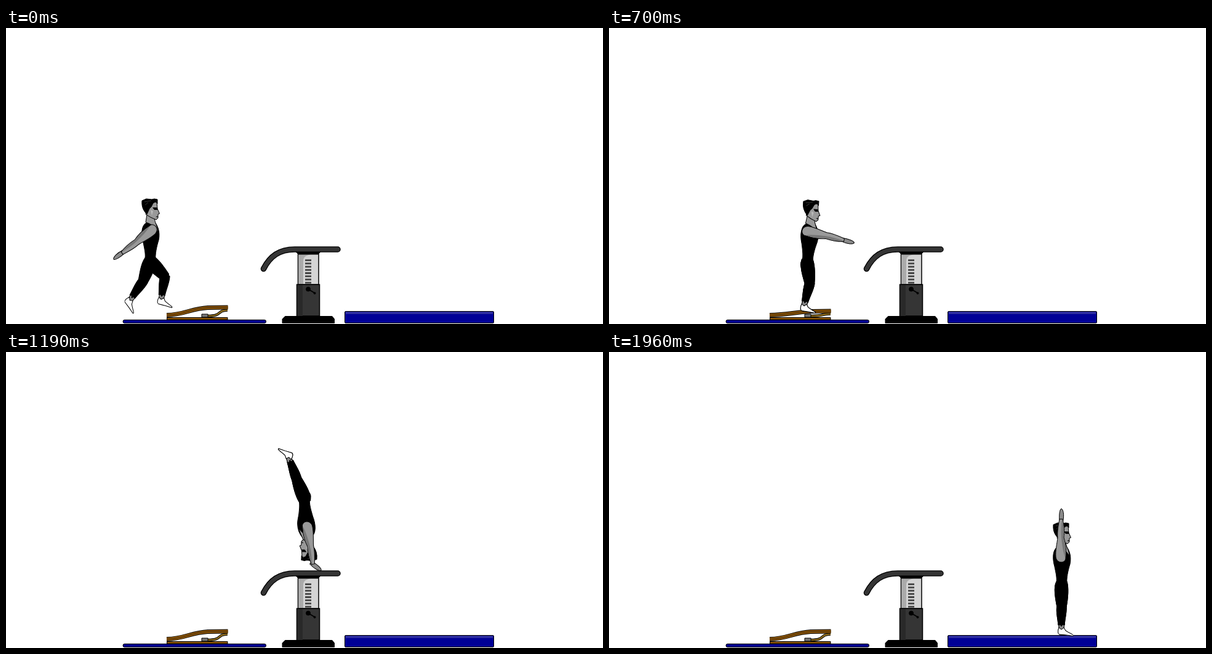
Animation of 970x480 px, one loop 2.38 s. Source, as an HTML page:

```html
<!DOCTYPE html>
<html lang="en">
<head>
<meta charset="utf-8">
<title>Vault</title>
<style>
  html, body { margin: 0; width: 100%; height: 100%; overflow: hidden; background: #fff; }
  svg { display: block; width: 100%; height: 100%; }
</style>
</head>
<body>
<svg viewBox="0 0 970 480" stroke="#000">
  <defs>
    <path id="thigh" d="M-8-6C-13 4-10 20-7 36C-4 40 5 40 8 36C11 20 12 4 9-6Z"/>
    <g id="shin">
      <path fill="#888" d="M-4 26L-4 37L4 37L5 26Z"/>
      <path d="M-7-2C-9 8-6 18-5 30L-2 29L0 32L2 29L5 30C6 18 9 8 8-2C5-5-4-5-7-2Z"/>
    </g>
    <path id="foot" fill="#fff" d="M-4-2C-6 3-6 8-3 9L8 10L19 11.500C22 10 13 7 7 3L4-2L0 1Z"/>
    <path id="beam" fill="none" stroke-linecap="round" d="M418.500 390.500C429 370 444 359 469 359H539"/>
  </defs>

  <!-- mats -->
  <rect x="190" y="473.300" width="232.500" height="5.400" rx="2.700" fill="#00008f"/>
  <rect x="550.500" y="459.500" width="242" height="19" rx="1.500" fill="#000096"/>
  <path d="M552 462H791" stroke="#3232a0" stroke-width="3.500"/>

  <!-- springboard -->
  <path d="M261.500 469.500H360V473H261.500Z" fill="#8c5608"/>
  <g fill="none">
    <path class="strut" stroke-width="4.500"/>
    <path class="strut" stroke="#8c6a1c" stroke-width="2.500"/>
    <path class="board" stroke-width="7"/>
    <path class="board" stroke="#8c5608" stroke-width="5"/>
    <path class="board" stroke="#3c2404"/>
  </g>
  <path d="M318 464H328V469H318Z" fill="#777"/>

  <!-- vaulting table -->
  <path d="M474.500 365H508V416H474.500Z" fill="#d4d4d4" stroke-width="1.500"/>
  <path d="M475.500 367H496C486 369 483 372 483 378V415H475.500Z" fill="#aaa" stroke="none"/>
  <path d="M491 375.300V415" stroke="#444" stroke-width="10" stroke-dasharray="2.800 2.400"/>
  <path d="M472.500 416H509.500V467H472.500Z" fill="#353535" stroke-width="1.500"/>
  <path d="M473 417H482V467H473Z" fill="#292929" stroke="none"/>
  <circle cx="491" cy="423.500" r="3.500"/>
  <path d="M491 423.500L502 430" stroke-width="2"/>
  <circle cx="501.500" cy="430" r="1.500"/>
  <path d="M453.500 467.500H530L533.500 472V478.500H449V472Z"/>
  <path d="M470 362H512L507 367H475Z"/>
  <use href="#beam" stroke-width="9.500"/>
  <use href="#beam" stroke="#353535" stroke-width="7"/>

  <!-- gymnast -->
  <g id="body" stroke-linejoin="round">
    <g id="farThigh"><use href="#thigh"/>
      <g id="farShin"><use href="#shin"/><g id="farFoot"><use href="#foot"/></g></g></g>
    <g id="nearThigh"><use href="#thigh"/>
      <g id="nearShin"><use href="#shin"/><g id="nearFoot"><use href="#foot"/></g></g></g>
    <g id="torso">
      <path d="M-6-62C-14-58-15-44-11-30C-9-20-7-12-8-4C-13 4-10 13 0 13C10 13 11 6 9 0C8-12 11-24 14-34C17-48 12-58 8-63Z"/>
      <path fill="#999" d="M-5-76L-7-63C-1-61 7-58 13-47C13-56 8-61 7-70Z"/>
      <g id="head">
        <path fill="#999" d="M-7 9L-4-8L11-11L12 0L15.500 8L13 9L13 15L10 18L1 14Z"/>
        <path fill="#bbb" stroke="none" d="M1 2L5 4L3 11Z"/>
        <path d="M-13-13L-6-16L3-15L7-16L12-15L12-8L9-12L5-9L2-3L-1 0L-5 9C-10 4-14-2-13-13Z"/>
        <path fill="none" stroke="#333" d="M-9-11L2-13M-8-6L-3-10"/>
        <path stroke="none" d="M4-2L12-2L12 2L7 2ZM9 13L13 12L12 14Z"/>
      </g>
    </g>
    <g id="arm">
      <g id="hand"><path fill="#8a8a8a" d="M-2.500-4C-5 7-3 16 0 17C3 16 4 6 3-4Z"/></g>
      <path fill="#999" d="M-7-4C-8-14 7-15 9-4C10 8 7 18 6 28C7 38 5 48 3 58L-2 58C-5 46-5 38-4 28C-8 16-8 6-7-4Z"/>
      <path fill="#777" stroke="none" d="M-6-4C-3 4-1 16 0 28C1 38 0 48-1 57C-4 46-4 38-3 28C-7 16-7 4-6-4Z"/>
    </g>
  </g>
</svg>
<script>
const LOOP = 2380, HOLD = 420, STEP = 70, LAST = 23;
const TAKEOFF = 5, PUSH = 12;
const THIGH = 35, SHIN = 36, SPINE = 49, FOREARM = 58;
const $ = id => document.getElementById(id);

// Key points [step, value, ...]; angles in degrees, clockwise.
const hipPath = [[0, 234, 378], [3, 282, 365], [TAKEOFF, 322, 380], [7, 348, 344], [9, 395, 302],
  [PUSH, 485, 238], [16, 627, 205], [19, 703, 293], [LAST, 735, 378]];
const leanPath = [[0, 0], [TAKEOFF, 4], [7, 43], [PUSH, 175], [16, 252], [19, 316], [LAST, 360]];
const reachPath = [[0, 52], [3, -8], [7, -145], [PUSH, -184], [17, -197], [LAST, -180]];

// Smooth curve through key points.
function along(points, step, channel = 1) {
  const at = i => points[Math.max(0, Math.min(points.length - 1, i))];
  const slope = i => (at(i + 1)[channel] - at(i - 1)[channel]) / (at(i + 1)[0] - at(i - 1)[0]);
  const i = Math.max(1, points.findIndex(p => p[0] >= step));
  const a = at(i - 1), b = at(i), span = b[0] - a[0];
  const u = (step - a[0]) / span, v = 1 - u;
  return v * v * (1 + 2 * u) * a[channel] + u * u * (3 - 2 * u) * b[channel]
    + u * v * span * (v * slope(i - 1) - u * slope(i));
}

function ramp(from, to, step) {
  const u = Math.max(0, Math.min(1, (step - from) / (to - from)));
  return u * u * (3 - 2 * u);
}

function place(id, x, y, angle) {
  $(id).setAttribute('transform', `translate(${x} ${y}) rotate(${angle})`);
}

function placeLeg(side, thigh, knee, ankle) {
  place(side + 'Thigh', 0, 0, thigh);
  place(side + 'Shin', 0, THIGH, knee);
  place(side + 'Foot', 0, SHIN, ankle);
}

function setPath(selector, d) {
  document.querySelectorAll(selector).forEach(p => p.setAttribute('d', d));
}

function draw(step) {
  const lean = along(leanPath, step), turn = lean * Math.PI / 180;
  const stride = Math.max(0, 1 - step / TAKEOFF) ** 2;
  const press = Math.max(0, 1 - Math.abs(step - TAKEOFF));
  const air = ramp(TAKEOFF, 7, step) * (1 - ramp(21, LAST, step));
  const grip = ramp(7, 9, step) * (1 - ramp(PUSH, 14, step));

  place('body', along(hipPath, step, 1), along(hipPath, step, 2), 0);
  place('torso', 0, 0, lean);
  place('head', 0, -85, 7 * air);
  place('arm', SPINE * Math.sin(turn), -SPINE * Math.cos(turn), lean + along(reachPath, step));
  place('hand', 0, FOREARM, -45 * grip);

  // piked up to the push-off, arched after it
  const leg = lean + air * (24 * ramp(PUSH, 16, step) - 16) - 10 * press;
  const knee = 20 * press, ankle = 32 * air - 10 * press;
  placeLeg('near', leg + 20 * stride, knee + 14 * stride, ankle + 14 * stride);
  placeLeg('far', leg - 43 * stride, knee + 52 * stride, ankle);

  const dip = 6 * press;
  setPath('.board', `M261 465.500C290 465 300 ${455 + dip} 328 ${453.500 + dip}L360.500 ${453 + dip}`);
  setPath('.strut', `M328 467C352 467 342 ${458 + dip} 360 ${457.500 + dip}`);
}

function tick() {
  const t = performance.now() % LOOP;
  draw(t < HOLD ? 0 : Math.min(LAST, Math.floor((t - HOLD) / STEP) + 1));
  requestAnimationFrame(tick);
}
tick();
</script>
</body>
</html>
```
